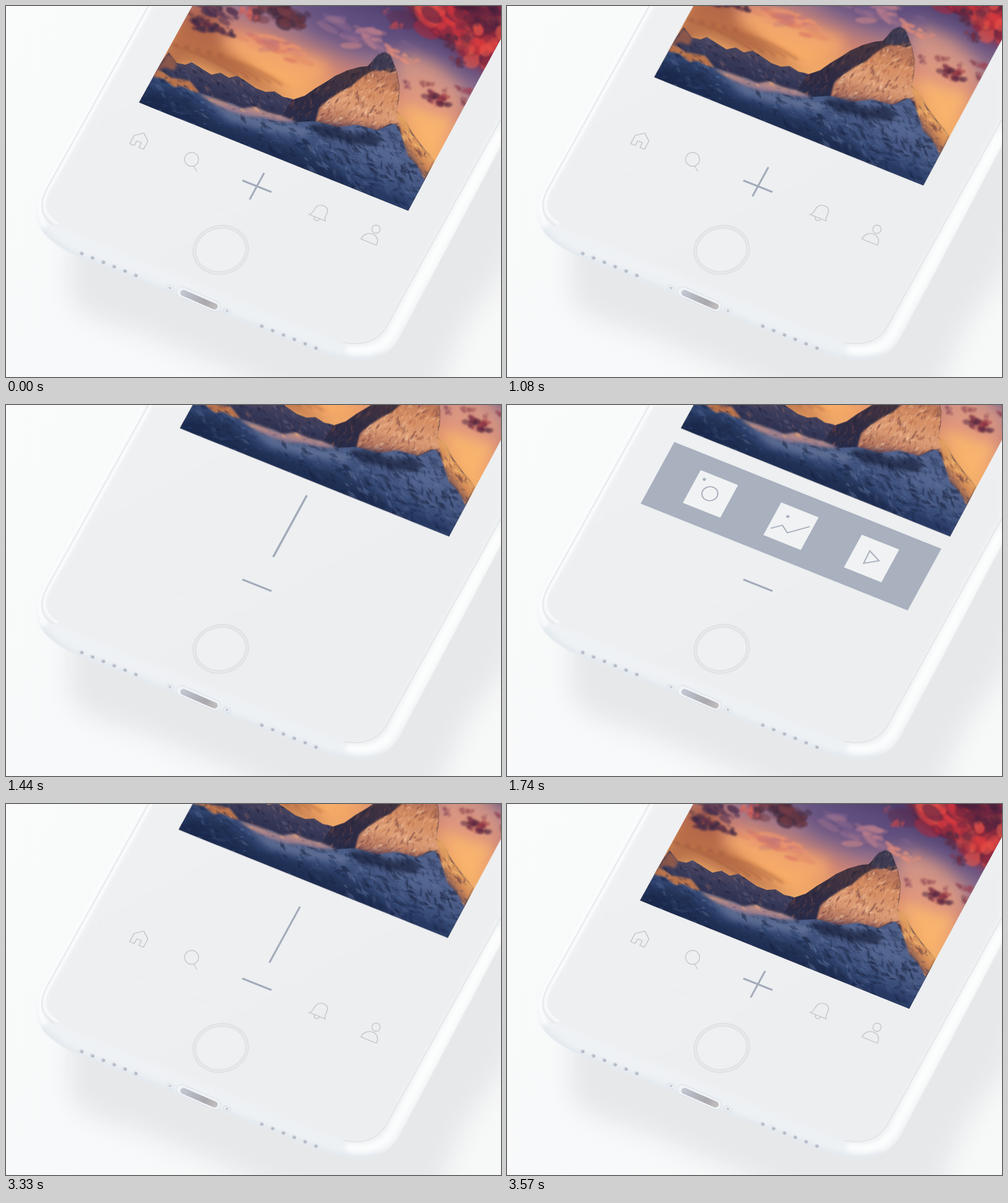
An HTML page with a canvas that plays this animation: 800 by 600 pixels, repeating every 3.6 s.

```html
<!DOCTYPE html>
<html lang="en">
<head>
<meta charset="utf-8">
<title>Add menu on a phone</title>
<style>
html, body { margin: 0; width: 100%; height: 100%; overflow: hidden; background: #f8fafa; }
canvas { display: block; width: 800px; height: 600px; }
</style>
</head>
<body>
<canvas id="stage" width="800" height="600"></canvas>
<script>
const begin = performance.now();
const LOOP = 3600, STEP = 30;
const GREY = '#a9b1bf', DARK = '#a3abb9', LINE = '#c6c9cd';
const ctx = document.getElementById('stage').getContext('2d');

let seed = 11;
const rnd = () => {
  seed = (seed + 0x6D2B79F5) | 0;
  let r = Math.imul(seed ^ (seed >>> 15), 1 | seed);
  r = (r + Math.imul(r ^ (r >>> 7), 61 | r)) ^ r;
  return ((r ^ (r >>> 14)) >>> 0) / 4294967296;
};
const spread = s => (rnd() + rnd() - 1) * s;

function layer(w, h, paint) {
  const c = document.createElement('canvas');
  c.width = w; c.height = h;
  paint(c.getContext('2d'));
  return c;
}
function ramp(c, x1, y1, x2, y2, ...stops) {
  const g = c.createLinearGradient(x1, y1, x2, y2);
  stops.forEach((s, i) => g.addColorStop(i / (stops.length - 1), s));
  return g;
}
function fill(c, d, style, blur = 0) {
  c.filter = blur ? `blur(${blur}px)` : 'none';
  c.fillStyle = style;
  c.fill(new Path2D(d));
  c.filter = 'none';
}
function stroke(c, d, style, width, blur = 0) {
  c.filter = blur ? `blur(${blur}px)` : 'none';
  c.strokeStyle = style;
  c.lineWidth = width;
  c.stroke(new Path2D(d));
  c.filter = 'none';
}
function oval(c, x, y, rx, ry, turn = 0) {
  c.beginPath();
  c.ellipse(x, y, rx, ry, turn, 0, 7);
}

// ---- phone ----
const BODY = 'M220 0L62 290C45 322 45 350 64 371C76 384 96 396 118 406L505 559C545 573 580 576 606 565C622 557 632 545 640 528L800 225V0Z';
const FACE = 'M238 0L70 300C56 326 60 344 88 359L530 539C572 556 600 546 616 516L800 182V0Z';

function pill(c, x, y, w, h, style, edge) {
  c.save();
  c.translate(x, y);
  c.rotate(0.41);
  c.beginPath();
  c.roundRect(-w / 2, -h / 2, w, h, h / 2);
  c.fillStyle = style;
  c.fill();
  if (edge) { c.strokeStyle = edge; c.lineWidth = 1; c.stroke(); }
  c.restore();
}

const phone = layer(800, 600, c => {
  c.fillStyle = ramp(c, 0, 0, 640, 600, '#f9fcfb', '#f8f9fa', '#f7f8f8');
  c.fillRect(0, 0, 800, 600);
  fill(c, 'M102 380V455C102 495 150 512 215 528L480 640L690 640L740 520L810 420L840 300L800 150Z', '#e6e8ea', 18);
  fill(c, BODY, ramp(c, 300, 300, 250, 455, '#f6f7f8', '#f2f4f6', '#eef1f4'), 1);
  c.save();
  c.clip(new Path2D(BODY));
  stroke(c, 'M58 360C76 384 96 396 118 406L505 559C545 573 580 576 606 565', 'rgba(216,223,232,.6)', 8, 4);
  stroke(c, 'M222 0L64 292C52 316 52 338 64 356', '#fbfcfd', 9, 3);
  stroke(c, 'M800 203L628 522C614 552 590 562 550 554', '#fcfdfd', 15, 4);
  fill(c, FACE, ramp(c, 250, 60, 480, 480, '#eef0f2', '#edeff1', '#eceef0'), 3);
  stroke(c, 'M800 183L616 516C602 543 575 550 545 544', 'rgba(220,224,228,.9)', 1.4, 0.7);
  stroke(c, 'M230 0L65 297C53 322 56 342 78 355', 'rgba(219,224,230,.9)', 1.3, 0.7);
  stroke(c, 'M235 0L69 299C58 321 60 338 84 352', 'rgba(255,255,255,.75)', 3, 1);
  c.restore();
  stroke(c, 'M196 112L125 247L637 436L706 308', 'rgba(228,231,233,.4)', 1);

  c.lineWidth = 1.2;
  for (const [r, tone] of [[45.2, '#e7e8ea'], [40.5, '#eef0f1']]) {
    oval(c, 347, 394.5, r, r - 5.7, -0.2);
    c.fillStyle = tone;
    c.fill();
    c.strokeStyle = '#dcdee0';
    c.stroke();
  }

  for (const [x, y] of [[122, 400], [413, 517.5]]) {
    for (let i = 0; i < 6; i++) {
      oval(c, x + i * 17.5, y + i * 7.1, 4, 3.5, 0.4);
      c.fillStyle = '#dce1e8';
      c.fill();
      oval(c, x + i * 17.5 + 0.6, y + i * 7.1 + 0.5, 2.6, 2.3, 0.4);
      c.fillStyle = '#b5bbc6';
      c.fill();
    }
  }
  for (const [x, y] of [[265, 456], [357, 493]]) {
    pill(c, x, y, 12, 7, '#eef1f5', '#d9dfe6');
    pill(c, x, y, 5, 3, '#c2c8d2');
  }
  pill(c, 311, 474, 76, 17, '#f0f3f6', '#dae0e8');
  pill(c, 312, 475, 65, 10, ramp(c, -32, -4, 32, 5, '#c3c9d3', '#b3b6bf', '#aaa8ad', '#c5c1c1'));
});

// ---- picture: sunset sky over a snowy peak ----
function cloud(c, x, y, w, h, tones, n, turn = 0.35) {
  c.filter = 'blur(1.5px)';
  for (let i = 0; i < n; i++) {
    c.globalAlpha = 0.3 + rnd() * 0.45;
    c.fillStyle = tones[Math.floor(rnd() * tones.length)];
    const u = spread(w), v = spread(h), k = 0.08 + rnd() * 0.2;
    oval(c, x + u * Math.cos(turn) - v * Math.sin(turn), y + u * Math.sin(turn) + v * Math.cos(turn), w * k, h * k + 1, turn + spread(0.6));
    c.fill();
  }
  c.globalAlpha = 1;
  c.filter = 'none';
}
// Angular flecks of rock and snow kept inside a shape.
function facets(c, d, [x, y, w, h], tones, n, size, turn) {
  c.save();
  c.clip(new Path2D(d));
  for (let i = 0; i < n; i++) {
    const px = x + rnd() * w, py = y + rnd() * h, a = turn + spread(0.9), l = size * (0.3 + rnd());
    const dx = Math.cos(a) * l, dy = Math.sin(a) * l, k = 0.2 + rnd() * 0.3;
    c.globalAlpha = 0.15 + rnd() * 0.4;
    c.fillStyle = tones[Math.floor(rnd() * tones.length)];
    c.beginPath();
    c.moveTo(px - dx, py - dy);
    c.lineTo(px - dy * k, py + dx * k);
    c.lineTo(px + dx, py + dy);
    c.lineTo(px + dy * k * rnd(), py - dx * k);
    c.fill();
  }
  c.restore();
}

const RANGE = 'M238 112L250 92L263 75L276 92L290 95L300 91L316 101L332 111L347 108L360 116L374 113L391 124L404 133L420 139L434 138L448 147L462 150L500 190L470 230L230 170Z';
const PEAK = 'M440 190L462 152L483 145L500 133L520 121L532 113L552 104L570 99L585 97L594 87L601 79L612 75L621 80L626 92L632 108L636 130L635 150L631 170L645 183L656 205L672 226L692 251L650 340L520 270Z';
const LIT = 'M500 187L506 165L522 151L540 139L558 130L573 117L590 106L606 103L622 108L631 104L636 132L633 160L631 171L647 184L640 197L622 190L600 201L568 195L540 199Z';
const SLOPE = 'M631 170L646 182L656 204L672 226L693 250L677 281L665 258L650 242L640 213Z';
const SNOW = 'M210 160L239 101L252 106L266 116L282 118L298 122L312 140L330 146L347 154L365 157L382 166L402 163L422 172L446 178L470 188L500 186L535 196L567 192L600 201L628 190L642 213L651 243L668 262L680 283L650 336Z';
const GLOW = 'M239 101L252 106L266 116L282 118L298 122L313 141L300 137L284 129L272 131L256 118L238 114Z';
const RIDGE = 'M311 142L347 153L382 166L402 163L422 172L446 178L470 188L440 186L414 180L390 180L366 172L340 160Z';

const picture = layer(840, 340, c => {
  c.clip(new Path2D('M215 156L650 331L828 0H301Z'));
  c.fillStyle = ramp(c, 552, -25, 475, 168, '#4b3b68', '#665482', '#92708c', '#cc8375', '#eea166', '#f3b16d');
  c.fillRect(0, 0, 840, 340);

  fill(c, 'M225 120L290 0L345 0L350 65L450 140L460 152L380 125L300 92Z', 'rgba(150,76,54,.62)', 11);
  fill(c, 'M350 55L395 45L520 90L520 115L450 138L410 110Z', 'rgba(255,180,108,.6)', 10);
  fill(c, 'M628 65L700 95L745 140L710 235L640 165Z', 'rgba(236,163,130,.7)', 13);
  fill(c, 'M638 158L722 185L690 245L668 220Z', 'rgba(253,186,108,.75)', 9);
  fill(c, 'M470 0H625L655 65L560 75L490 45Z', 'rgba(93,76,125,.6)', 14);
  for (let i = 0; i < 10; i++) {
    const x = 270 + i * 9, y = 62 + i * 2;
    stroke(c, `M${x} ${y}Q${x + 60} ${y + 18} ${x + 105} ${y + 50}`, i % 2 ? 'rgba(238,150,84,.5)' : 'rgba(112,56,54,.42)', 3, 2);
  }
  cloud(c, 440, 65, 75, 16, ['#dd7c66', '#ea9470', '#b9707c'], 28);
  cloud(c, 585, 55, 85, 20, ['#a2738f', '#795f8b', '#c98589'], 28);
  cloud(c, 640, 84, 35, 9, ['#e88f79', '#ef9f80'], 14);

  fill(c, 'M640 -10H840L790 115L742 88L712 48L668 18Z', 'rgba(160,42,62,.8)', 8);
  cloud(c, 735, 18, 95, 48, ['#d8393f', '#a82a3e', '#f0584a', '#632744', '#4d2440'], 150);
  cloud(c, 770, 55, 50, 48, ['#d5383e', '#5b2440', '#ee5c4c', '#8f2b40'], 80);
  cloud(c, 762, 8, 45, 25, ['#43203c', '#6a2640'], 36);
  cloud(c, 720, 56, 17, 14, ['#4d2942', '#673047'], 22);
  cloud(c, 731, 90, 14, 9, ['#5c2b42', '#863548'], 20);
  cloud(c, 445, 12, 50, 25, ['#56303f', '#3f293e', '#743c46'], 65);
  cloud(c, 394, 8, 16, 14, ['#ef6e51', '#d45454'], 18);
  cloud(c, 340, 5, 42, 15, ['#5d3955', '#3e2c4c'], 38);
  cloud(c, 321, 31, 31, 12, ['#4c2e4a', '#603248', '#372944'], 44);
  cloud(c, 357, 43, 14, 9, ['#4b2f49', '#653a48'], 20);
  cloud(c, 630, 31, 18, 7, ['#a64554', '#c65658'], 16, -0.2);
  cloud(c, 614, 12, 10, 8, ['#824763', '#ad5264'], 12, -0.6);
  cloud(c, 697, 150, 25, 13, ['#6b2c43', '#a03c47', '#522841'], 40);
  cloud(c, 680, 125, 14, 7, ['#814051', '#a35459'], 16);
  cloud(c, 648, 128, 9, 7, ['#754359', '#985060'], 16);
  cloud(c, 741, 136, 17, 6, ['#a3485a', '#8a3d51'], 16);
  cloud(c, 740, 156, 8, 8, ['#643047', '#8b3b4b'], 12);
  cloud(c, 710, 135, 7, 5, ['#8a4253'], 8);

  fill(c, RANGE, ramp(c, 345, 98, 325, 165, '#514a62', '#363858', '#262a49'), 0.5);
  facets(c, RANGE, [235, 75, 230, 110], ['#20243f', '#5f5b74', '#4b5072', '#7a5a60', '#1b2039', '#343a5c'], 620, 6, 0.9);
  fill(c, 'M240 108L263 76L276 91L272 104L256 99Z', 'rgba(170,98,68,.7)', 2);

  fill(c, PEAK, ramp(c, 530, 105, 510, 290, '#47363f', '#2c2a45', '#223252', '#1a2645'), 0.5);
  facets(c, PEAK, [450, 75, 190, 115], ['#5b4048', '#262539', '#3a3650', '#1e2038', '#774a49'], 420, 7, 2.1);
  fill(c, LIT, ramp(c, 592, 98, 562, 202, '#b27059', '#d48c62', '#dc9d76', '#a96a58'), 1);
  facets(c, LIT, [500, 100, 150, 105], ['#f2bd94', '#925446', '#e39a69', '#6b4148', '#f0cbaa', '#bb6c47'], 620, 6, 2.25);
  fill(c, 'M505 185L560 190L600 197L645 190L640 205L500 200Z', 'rgba(78,56,80,.55)', 3);
  fill(c, 'M588 101L594 87L602 79L612 75L621 80L630 105L618 101L604 105Z', '#3d3a51', 1);
  facets(c, PEAK, [590, 74, 40, 32], ['#5b576d', '#2a2c46', '#94695f'], 50, 5, 2);

  fill(c, SNOW, ramp(c, 495, 180, 435, 300, '#51628c', '#394d79', '#263a64', '#1a2748'));
  fill(c, 'M225 140L262 132L300 150L345 190L400 205L470 226L520 250L560 290L500 275L390 230L300 190L220 165Z', 'rgba(25,36,66,.5)', 6);
  fill(c, 'M322 152L380 172L440 188L500 200L480 212L420 202L360 186Z', 'rgba(116,128,164,.6)', 5);
  fill(c, 'M555 212L625 225L640 255L600 250L565 232Z', 'rgba(88,106,148,.6)', 6);
  facets(c, SNOW, [215, 100, 470, 235], ['#1a2544', '#223154', '#455a86', '#566c97', '#18213d', '#2a406a'], 1300, 8, 0.55);
  facets(c, SNOW, [480, 195, 180, 110], ['#18203a', '#222d4c', '#5c6f98'], 260, 9, 0.8);
  fill(c, 'M490 190L533 195L558 206L590 204L608 214L600 226L560 224L537 216L507 212Z', 'rgba(24,30,56,.65)', 3);
  fill(c, 'M215 156L226 140L265 156L302 186L390 222L650 312L650 331Z', 'rgba(20,34,72,.4)', 6);
  fill(c, GLOW, 'rgba(206,122,68,.85)', 1.5);
  facets(c, GLOW, [235, 100, 80, 42], ['#eaa364', '#7e4a4c', '#4a384d', '#cf8150'], 110, 5, 0.8);
  fill(c, RIDGE, ramp(c, 390, 160, 384, 186, '#d0967c', '#9b7d8f', 'rgba(92,104,142,.4)'), 2);
  facets(c, RIDGE, [310, 140, 160, 45], ['#dd9f7c', '#55526d', '#ab8388'], 60, 6, 0.5);
  fill(c, SLOPE, ramp(c, 674, 217, 642, 240, '#efb068', '#d28a56', '#614656'), 1.5);
  facets(c, SLOPE, [630, 170, 65, 110], ['#f5bd78', '#8b5549', '#c97f51', '#553f4e'], 140, 7, 1);
});

// ---- interface, laid out in the tilted plane of the screen ----
function plane(x, y, paint) {
  ctx.save();
  ctx.transform(0.93, 0.3725, -0.45, 0.825, x, y);
  paint();
  ctx.restore();
}
const dot = (x, y, r) => { oval(ctx, x, y, r, r); ctx.fill(); };
const ring = (x, y, r) => { oval(ctx, x, y, r, r); ctx.stroke(); };

function nav(alpha) {
  if (alpha <= 0) return;
  ctx.globalAlpha = alpha;
  const w = 1.5;
  plane(216, 218, () => stroke(ctx, 'M-12 11V-5L0 -15L12 -5V11H4V2H-4V11Z', LINE, w));
  stroke(ctx, 'M303 258.5L308.5 267.5', LINE, 1.4);
  ring(300, 248, 11.3);
  plane(507, 335, () => {
    stroke(ctx, 'M-14 9C-10 6 -11 0 -10.5 -4C-10 -18 10 -18 10.5 -4C11 0 10 6 14 9ZM-4.5 9C-4 16 4 16 4.5 9', LINE, w);
  });
  ring(598, 361, 6.7);
  plane(588, 377, () => stroke(ctx, 'M-13 5.5C-13 -15 14 -15 14 5.5Z', LINE, w));
  ctx.globalAlpha = 1;
}

function tiles() {
  ctx.fillStyle = '#f1f2f3';
  for (const x of [-140, 0, 140]) ctx.fillRect(x - 32.5, -32, 65, 64);
  ctx.fillStyle = GREY;
  dot(-160, -19.5, 2.6);
  dot(-12, -13.5, 2.6);
  stroke(ctx, 'M-27.5 16.5L-13 4L0 13L27 -11.5M131.5 -11L152.5 -1L132.5 13Z', GREY, 2);
  ring(-141, 0, 12.5);
}

const part = (t, start, len) => Math.min(1, Math.max(0, (t - start) / len));
const ease = p => p < 0.5 ? 4 * p ** 3 : 1 - 4 * (1 - p) ** 3;
// Rises over one span and falls back over another.
const swing = (t, a, la, b, lb) => ease(part(t, a, la)) - ease(part(t, b, lb));

function draw(t) {
  const lift = swing(t, 890, 430, 3270, 300);
  const rise = swing(t, 960, 450, 3205, 365);
  const open = swing(t, 1420, 320, 3040, 190);

  ctx.drawImage(phone, 0, 0);
  ctx.drawImage(picture, 66 * lift, -118.5 * lift);
  nav(1 - part(t, 1200, 210) + part(t, 3060, 210));

  if ((t >= 630 && t < 900) || (t >= 2640 && t < 2910)) {
    ctx.fillStyle = 'rgba(160,170,185,.09)';
    dot(405, 291, 15);
  }
  plane(405.5, 291.5, () => {
    ctx.fillStyle = DARK;
    ctx.fillRect(-25.3, -1.6, 50.6, 3.2);
  });
  plane(405.5 + 53.5 * rise, 291.5 - 95.5 * rise, () => {
    const w = 3 + 461 * open, h = 52 + 69 * rise;
    ctx.beginPath();
    ctx.rect(-w / 2, -h / 2, w, h);
    ctx.fillStyle = open > 0.01 ? GREY : DARK;
    ctx.fill();
    if (open > 0.01) {
      ctx.clip();
      tiles();
    }
  });
}

function tick() {
  const t = (performance.now() - begin) % LOOP;
  draw(Math.floor(t / STEP) * STEP);
  requestAnimationFrame(tick);
}
tick();
</script>
</body>
</html>
```
